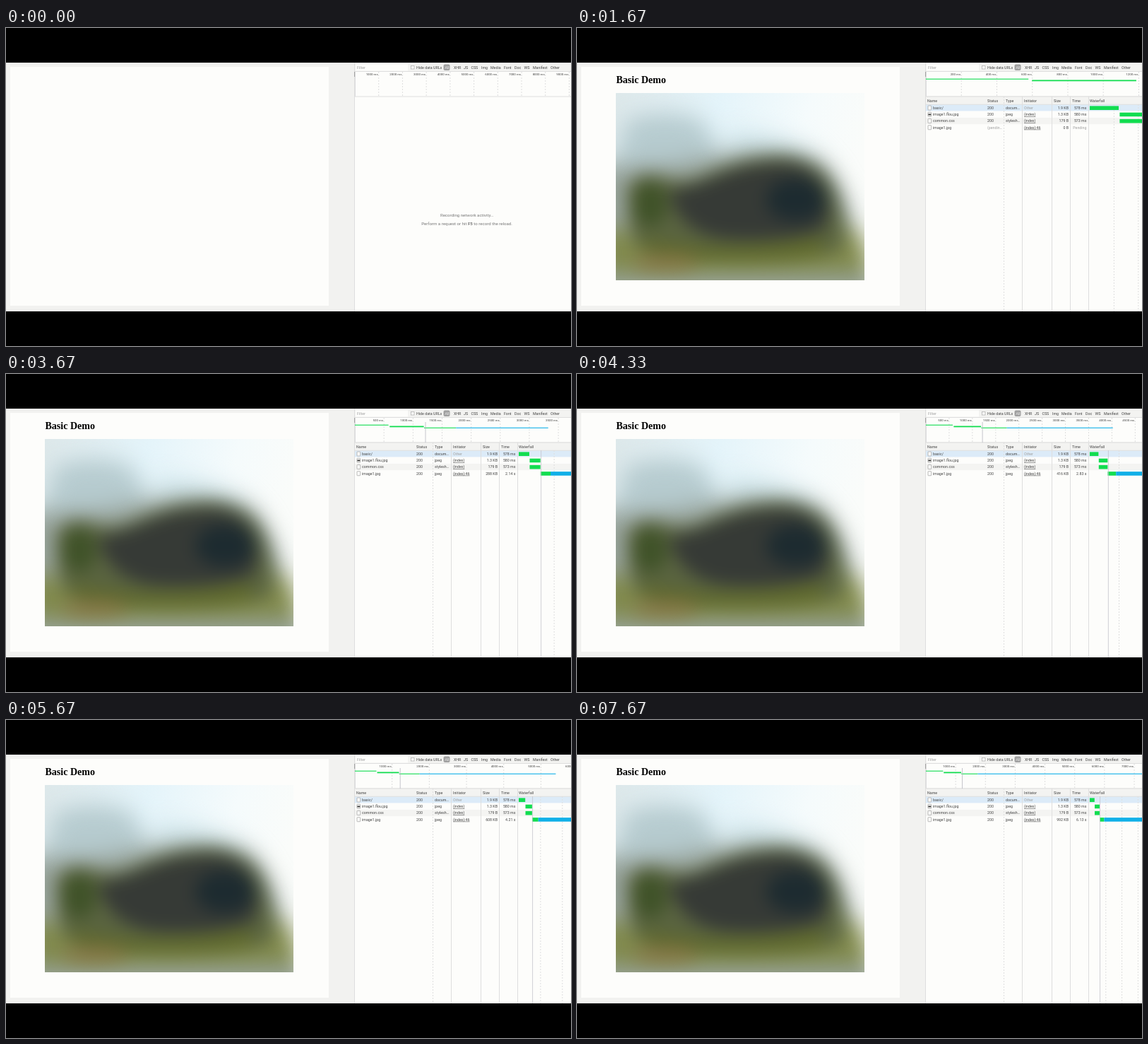
Animation, 800 px wide and 450 px high, one loop 8000 ms. Source, as an HTML page:

```html
<!DOCTYPE html>
<html lang="en">
<head>
<meta charset="utf-8">
<title>Basic Demo</title>
<style>
  html, body { margin: 0; width: 100%; height: 100%; overflow: hidden; background: #000; }
  svg { display: block; width: 100vw; height: 100vh; }
  text { font: 5.3px Roboto, "Noto Sans", sans-serif; fill: #444; white-space: pre; }
  .tick { font-size: 4.4px; }
  .dim { fill: #a0a0a0; }
  .link { text-decoration: underline; }
  .note { font-size: 6.1px; fill: #777; text-anchor: middle; }
  .end { text-anchor: end; }
  .title { font: bold 14px "Liberation Serif", "Times New Roman", serif; fill: #000; }
  .grid { stroke: #dedede; stroke-width: 1; }
  .dash { stroke-dasharray: 2 2; }
</style>
</head>
<body>
<svg viewBox="0 0 800 450">
  <defs>
    <clipPath id="photoClip"><rect x="55" y="92" width="352" height="265"/></clipPath>
    <linearGradient id="sky" x1="0" y1="0" x2="1" y2="0.25">
      <stop offset="0" stop-color="#dde8ea"/>
      <stop offset="0.4" stop-color="#e4f4fa"/>
      <stop offset="0.75" stop-color="#f5fbfc"/>
      <stop offset="1" stop-color="#fafcfa"/>
    </linearGradient>
    <filter id="soft" x="-50%" y="-50%" width="200%" height="200%" color-interpolation-filters="sRGB">
      <feGaussianBlur stdDeviation="16"/>
    </filter>
    <filter id="mid" x="-50%" y="-50%" width="200%" height="200%" color-interpolation-filters="sRGB">
      <feGaussianBlur stdDeviation="12"/>
    </filter>
  </defs>

  <rect y="49" width="800" height="352" fill="#f2f2f0"/>
  <rect x="6" y="55" width="451" height="338" fill="#fdfdfb"/>

  <g id="page">
    <text class="title" x="55.5" y="78">Basic Demo</text>
    <g clip-path="url(#photoClip)">
      <rect x="55" y="92" width="352" height="265" fill="url(#sky)"/>
      <g filter="url(#soft)">
        <path d="M70 130 Q130 112 175 130 Q200 155 200 200 L50 205 Z" fill="#b6cbcf"/>
        <path d="M205 145 Q280 140 345 180 L220 185 Z" fill="#d3e8ee"/>
        <path d="M20 192 Q120 200 185 182 Q290 160 350 190 Q388 235 394 300 L440 390 L20 390 Z" fill="#98a49c"/>
        <path d="M30 285 L400 285 L420 348 L30 348 Z" fill="#818a4c"/>
      </g>
      <g filter="url(#mid)">
        <path d="M72 222 Q92 200 125 212 Q155 220 185 205 Q240 182 290 182 Q345 186 364 228 Q384 275 374 312 Q350 330 230 330 Q105 330 84 308 Q66 270 72 222 Z" fill="#5a6440"/>
        <path d="M130 232 Q165 225 205 207 Q250 190 295 191 Q338 194 354 233 Q364 265 345 288 Q290 304 210 299 Q145 290 130 232 Z" fill="#363a36"/>
        <ellipse cx="104" cy="249" rx="23" ry="32" fill="#3f5228"/>
        <ellipse cx="310" cy="243" rx="42" ry="30" fill="#1d2b30"/>
        <path d="M90 298 Q200 324 350 296 L345 318 Q200 334 95 314 Z" fill="#606a28"/>
        <ellipse cx="125" cy="332" rx="48" ry="11" fill="#88794a"/>
      </g>
    </g>
  </g>

  <rect x="494" y="49" width="306" height="352" fill="#fdfdfb"/>
  <rect x="494" y="49" width="306" height="12.5" fill="#f3f3f1"/>
  <rect x="495" y="51" width="74" height="9.5" fill="#fdfdfb"/>
  <path class="grid" d="M493.5 49V401M494 61.5H800M494 97H800"/>
  <g id="toolbar">
    <text class="dim" x="497" y="57.8">Filter</text>
    <rect x="573.5" y="53.5" width="4.5" height="4.5" fill="#fdfdfb" stroke="#b4b4b4" stroke-width="0.8"/>
    <rect x="619.5" y="51.5" width="9" height="8.5" rx="2" fill="#a0a0a0"/>
    <text x="621.4" y="57.7" style="fill:#eee">All</text>
  </g>
  <g id="net"></g>

  <path d="M0 0H800V49H0ZM0 401H800V450H0Z"/>
</svg>

<script>
const LOOP = 8000, FRAMES = 24;
const LEFT = 494, FALL = 726, RULER_WIDTH = 314;
const DOC_END = 578, CSS_START = 598, CSS_END = 1186, IMG_START = 1190, WAIT = 550, READY = 1210;
const GREEN = "#12dd50", BLUE = "#10b0e8";

const net = document.getElementById("net");
const page = document.getElementById("page");

const text = (x, y, s, cls = "") => `<text x="${x}" y="${y}" class="${cls}">${s}</text>`;
const box = (x, y, w, h, fill) =>
  `<rect x="${x}" y="${y}" width="${Math.max(0, w)}" height="${h}" fill="${fill}"/>`;
const vline = (x, y1, y2, cls = "grid") => `<path class="${cls}" d="M${x} ${y1}V${y2}"/>`;

// Piecewise linear value through [time, value] points
function track(points, t) {
  let i = 1;
  while (i < points.length - 1 && t > points[i][0]) i++;
  const [[a, u], [b, v]] = [points[i - 1], points[i]];
  return u + (v - u) * Math.min(1, Math.max(0, (t - a) / (b - a)));
}

const imgTime = t => track([[1667, 23], [3000, 1440], [4333, 2830], [5667, 4210], [7667, 6130]], t);
const imgSize = t => track([[2140, 0], [3000, 128], [4333, 416], [5667, 608], [7667, 992]], t);

// The ruler grows in steps of a quarter whenever the requests outrun it
const rulerScale = ms => RULER_WIDTH / (1000 * 1.25 ** Math.ceil(Math.log(ms / 1000) / Math.log(1.25)));
const IDLE_SCALE = rulerScale(9000);

const filters = { "Hide data URLs": 581, XHR: 634, JS: 648, CSS: 658.5, Img: 673, Media: 686, Font: 705,
  Doc: 720, WS: 733.5, Manifest: 746, Other: 771 };
document.getElementById("toolbar").innerHTML +=
  Object.entries(filters).map(([s, x]) => text(x, 57.8, s)).join("");

function ruler(scale) {
  const step = [100, 200, 500, 1000].find(s => s * scale > 30);
  let out = box(493, 62, 1.5, 7, "#a0a0a0") + vline(494.5, 62, 97);
  for (let x = LEFT + step * scale, v = step; x < 820; x += step * scale, v += step) {
    out += vline(x, 62, 97, "grid dash") + text(x - 1, 67.3, v + " ms", "tick end");
  }
  return out;
}

function row(i, r) {
  const y = 113 + i * 9.25, base = y + 1.9;
  const state = r.pending ? "dim" : "";
  let out = box(494, y - 4.6, 306, 9.25, ["#dcebf8", "#fdfdfb", "#f4f4f2", "#fdfdfb"][i]);
  out += `<rect x="497" y="${y - 3}" width="4.6" height="6" rx=".5" fill="#fdfdfb" stroke="#a8a8a8" stroke-width=".8"/>`;
  if (r.pic) out += box(497.4, y - 0.8, 3.8, 2, "#444");
  out += text(504, base, r.name);
  out += text(581, base, r.pending ? "(pendin…" : "200", state);
  out += text(607, base, r.type);
  out += text(633, base, r.from, r.from === "Other" ? "dim" : "link");
  out += text(696, base, r.size || "0 B", "end");
  out += text(721.5, base, r.pending ? "Pending" : r.time, "end " + state);
  return out;
}

function table(rows) {
  const heads = { Name: 496, Status: 581, Type: 607, Initiator: 633, Size: 675, Time: 701, Waterfall: 726 };
  return box(494, 97, 306, 11.4, "#f3f3f1") + rows.map((r, i) => row(i, r)).join("") +
    vline(604.5, 97, 401, "grid dash") +
    [630.5, 672.5, 698.5, 724.5].map(x => vline(x, 97, 401)).join("") +
    Object.entries(heads).map(([s, x]) => text(x, 104.6, s)).join("") +
    '<path class="grid" d="M494 97H800M494 108.2H800"/>';
}

function bars(total, over, receiving) {
  const fall = 86 / total;
  const line = (from, to, y, h, fill) => box(LEFT + from * over, y, (to - from) * over, h, fill);
  const bar = (i, from, to, fill) => box(FALL + from * fall, 110.4 + i * 9.25, (to - from) * fall, 5.6, fill);
  let out = "";
  const step = total < 2000 ? 500 : 2000;
  for (let v = step; v * fall < 80; v += step) out += vline(FALL + v * fall * 0.97, 108, 401, "grid dash");
  out += line(0, DOC_END, 71.7, 1.1, GREEN) + bar(0, 0, DOC_END, GREEN);
  if (total < CSS_END) return out;
  out += line(CSS_START, CSS_END, 73.5, 1.8, GREEN);
  out += bar(1, CSS_START, CSS_END, GREEN) + bar(2, CSS_START, CSS_END, GREEN);
  if (!receiving) return out;
  const first = IMG_START + WAIT;
  out += line(IMG_START, first, 75.7, 1.1, GREEN) + line(first, total, 75.7, 1.1, BLUE);
  out += bar(3, IMG_START, first, GREEN) + bar(3, first, total, BLUE);
  out += box(LEFT + READY * over, 68, 0.8, 29, "#b8b8c0");
  out += box(FALL + READY * fall, 108, 0.8, 293, "#c4c4cc");
  return out;
}

function draw(n) {
  const t = n * LOOP / FRAMES;
  page.style.display = n >= 5 ? "" : "none";

  if (n < 2) {
    net.innerHTML = ruler(IDLE_SCALE) + text(652.5, 267, "Recording network activity…", "note") +
      text(652.5, 279, 'Perform a request or hit <tspan font-weight="bold">F5</tspan> to record the reload.', "note");
    return;
  }

  const basic = { name: "basic/", type: "docum…", from: "Other", size: "1.9 KB", time: "578 ms" };
  if (n < 4) {
    net.innerHTML = ruler(IDLE_SCALE) + table([{ ...basic, type: "", size: "", pending: true }]);
    return;
  }

  const css = { name: "common.css", type: "stylesh…", from: "(index)" };
  const blur = { name: "image1.flou.jpg", type: "", from: "(index)" };
  if (n === 4) {
    css.pending = blur.pending = true;
    const scale = rulerScale(DOC_END);
    net.innerHTML = ruler(scale) + table([basic, css, blur]) + bars(DOC_END, scale, false);
    return;
  }

  Object.assign(css, { size: "179 B", time: "573 ms" });
  Object.assign(blur, { type: "jpeg", size: "1.3 KB", time: "580 ms", pic: true });
  const receiving = t > 2140;
  const image = { name: "image1.jpg", type: "", from: "(index):46", pending: !receiving };
  const ms = imgTime(t);
  if (receiving) {
    image.type = "jpeg";
    image.size = Math.round(imgSize(t) / 32) * 32 + " KB";
    image.time = ms < 1000 ? Math.round(ms) + " ms" : (ms / 1000).toFixed(2) + " s";
  }
  const total = IMG_START + ms;
  const scale = rulerScale(receiving ? total : CSS_END);
  net.innerHTML = ruler(scale) + table([basic, blur, css, image]) + bars(total, scale, receiving);
}

let shown = -1;
function tick() {
  const t = performance.now() % LOOP;
  const n = Math.min(FRAMES - 1, Math.floor((t + 4) * FRAMES / LOOP));
  if (n !== shown) draw(shown = n);
  requestAnimationFrame(tick);
}
tick();
</script>
</body>
</html>
```
